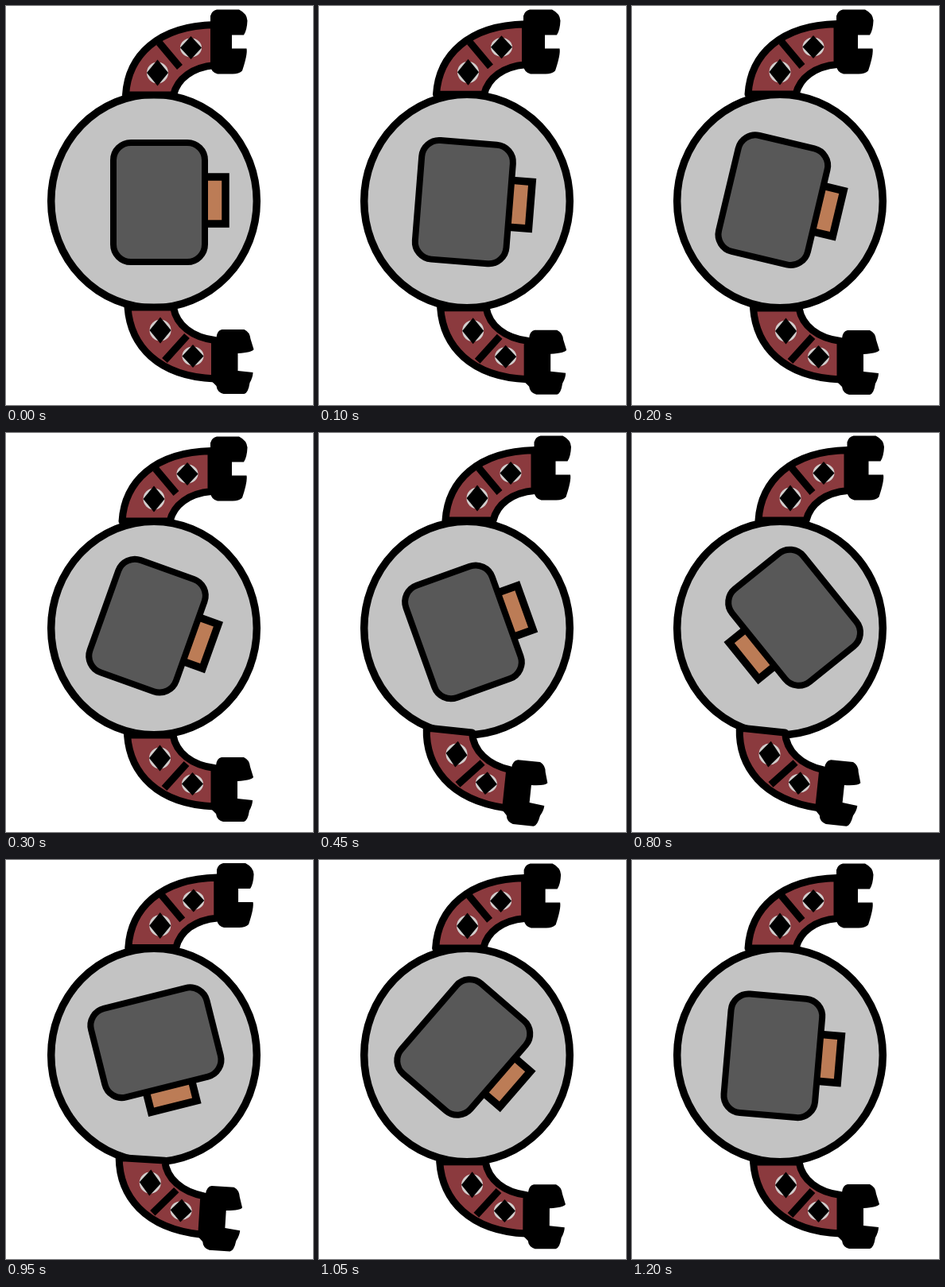
Animation, 386 px wide and 502 px high, one loop 1.25 s. Source, as an HTML page:

```html
<!DOCTYPE html>
<html lang="en">
<head>
<meta charset="utf-8">
<title>Spinning guard</title>
<style>
  html, body { margin: 0; width: 100%; height: 100%; overflow: hidden; background: #fff; }
  svg { display: block; width: 386px; height: 502px; }
  .arm { fill: #8b3a3e; stroke: #000; stroke-width: 9; stroke-linejoin: round; }
</style>
</head>
<body>
<svg viewBox="0 0 386 502">
  <defs>
    <g id="gem">
      <circle r="13.5" fill="#d2cecd"/>
      <path d="M0 -16.500L13.500 0L0 16.500L-13.500 0Z"/>
    </g>
  </defs>
  <ellipse cx="186" cy="245.500" rx="129.300" ry="134.300" fill="#c3c3c3" stroke="#000" stroke-width="9.500"/>
  <g id="upper">
    <path class="arm" d="M146 111C149 62 186 24 258 22.500V73.500C230 76 211 90 206 111Z"/>
    <path class="arm" d="M188 45L214 76"/>
    <use href="#gem" transform="translate(186 83)"/>
    <use href="#gem" transform="translate(228 51.500) scale(1 .88)"/>
  </g>
  <path id="upperClaw" d="M265 4H293Q303 9 303.500 18Q303 30 299 36H284V53H302.500Q304 60 297 81Q293 85 285 85H266Q258 83 257 75V12Q259 5 265 4Z"/>
  <g id="lower">
    <path class="arm" d="M152.500 380C156 428 190 467 262 470V421.500C234 418 214 403 210 380Z"/>
    <path class="arm" d="M227 416L199 447"/>
    <use href="#gem" transform="translate(193.500 409)"/>
    <use href="#gem" transform="translate(234.500 441.500) scale(1 .88)"/>
    <path d="M271 408H299Q306 411 307 420L311 433Q309 437 291 438V460L310 462Q310 468 306 475Q304 488 299 489H273Q265 487 264 479L259 474V421L264 418Q265 409 271 408Z"/>
  </g>
  <g id="head" stroke="#000">
    <rect x="54" y="-32" width="29.500" height="59" fill="#bc7c56" stroke-width="9.500"/>
    <rect x="-57.500" y="-75" width="115" height="150" rx="22" fill="#585858" stroke-width="8"/>
  </g>
</svg>
<script>
  const LOOP = 1250, STEP = 50;
  const parts = ['head', 'upper', 'upperClaw', 'lower'];
  const [head, upper, upperClaw, lower] = parts.map(id => document.getElementById(id));

  const ramp = (t, from, to) => Math.min(1, Math.max(0, (t - from) / (to - from)));
  const smooth = (t, from, to) => {
    const p = ramp(t, from, to);
    return p * p * (3 - 2 * p);
  };
  const easeOut = (t, from, to) => 1 - (1 - ramp(t, from, to)) ** 1.53;
  const pose = (part, transform) => part.setAttribute('transform', transform);

  function draw() {
    const t = Math.floor(performance.now() % LOOP / STEP) * STEP;

    // The head winds up clockwise, then whips round once the other way.
    const angle = 20 * smooth(t, 0, 325) - 12 * smooth(t, 325, 408) - 368 * easeOut(t, 408, LOOP);
    const reach = ramp(t, 0, 150);
    const shift = ramp(t, 350, 450) - ramp(t, 1050, 1200);
    pose(head, `translate(${192 + 2.3 * shift} ${245.2 - 2 * shift}) rotate(${angle})
      translate(${0.5 - 15 * reach} ${1.8 + 0.6 * reach})`);

    // The arms swing in opposite directions during the spin.
    const lean = ramp(t, 350, 450) - smooth(t, 850, 1080);
    const rest = 1 - reach;
    pose(upper, `translate(${13 * lean + 4.5 * rest} ${rest - lean})`);
    pose(upperClaw, `translate(${13.5 * lean} ${0.5 - lean})`);
    pose(lower, `translate(${0.5 * rest - 20.5 * lean} ${-rest - 5 * lean}) rotate(${6 * lean} 193 409)`);

    requestAnimationFrame(draw);
  }
  draw();
</script>
</body>
</html>
```
